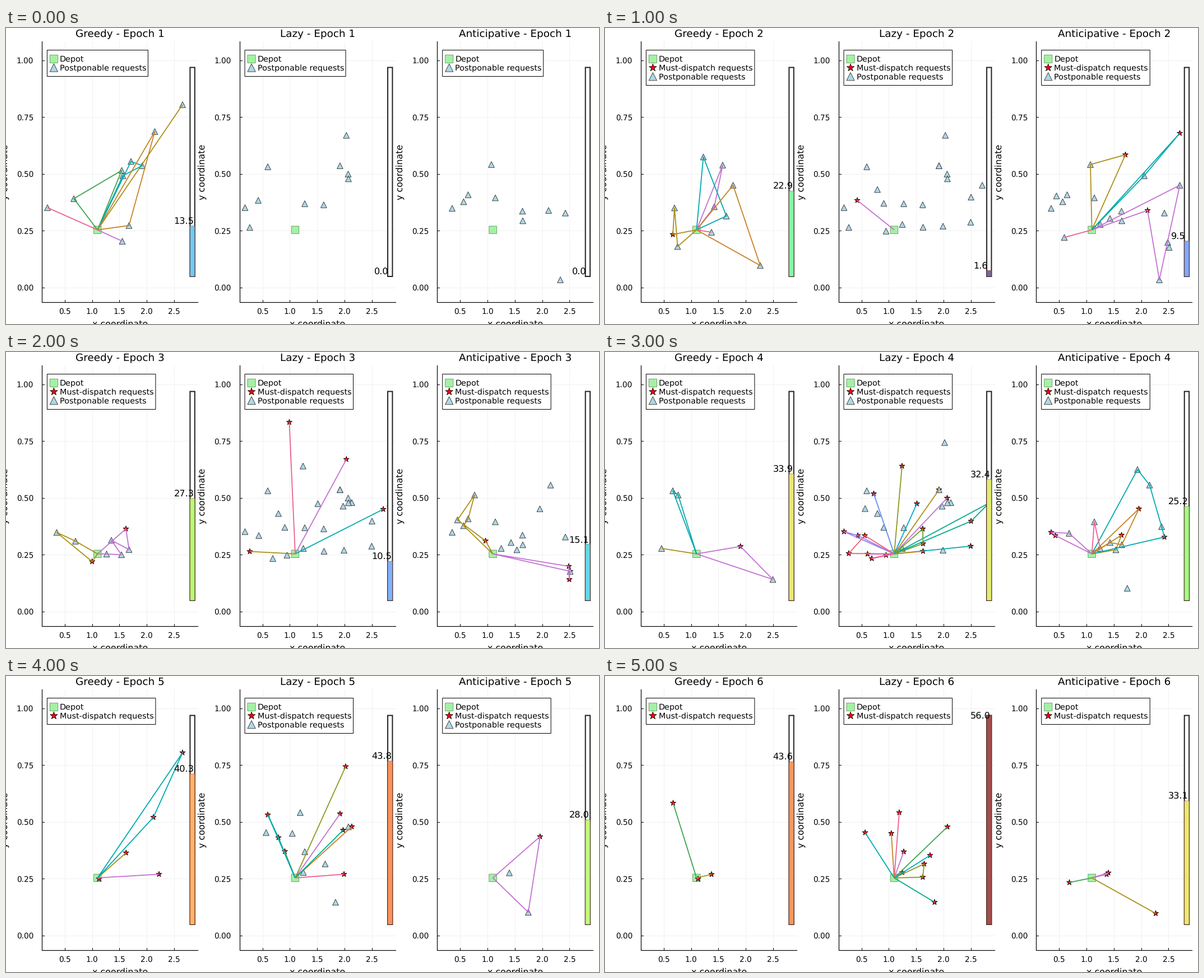
Recreate the animation shown at these times as a matplotlib script. Size 1058 px wide and 529 px high, loop 6 s.

```python
import math

import matplotlib.pyplot as plt
from matplotlib.animation import FuncAnimation
from matplotlib.patches import Polygon, Rectangle

W, H, DPI = 1058, 529, 100
PT = 72 / DPI
PANEL = W / 3
EPOCHS = 6

LEFT, RIGHT, TOP, BOTTOM = 64, 342, 24, 490
X_TICKS = [(f"{0.5 * k:.1f}", 56.1 + 48.8 * k) for k in range(1, 6)]
Y_TICKS = [(f"{0.25 * k:.2f}", 463.9 - 101.5 * k) for k in range(5)]
BAR_LEFT, BAR_WIDTH, BAR_BOTTOM, BAR_HEIGHT, BAR_MAX = 328.4, 8.4, 444, 373.5, 56
DEPOT = (163.3, 360.8)

PALETTE = ["#009afa", "#e36f47", "#3ea44e", "#c371d2", "#ac8e18", "#00aaae",
           "#ed5e93", "#c68225", "#00a98d", "#8e971e", "#00a9cc", "#9b7fe9",
           "#618df6", "#f06073", "#dd65b6", "#6c9f33"]

# Marker outlines in a box from -1 to 1, y pointing down.
SQUARE = [(-1, -1), (1, -1), (1, 1), (-1, 1)]
TRIANGLE = [(0, -1), (1, 1), (-1, 1)]
STAR = [(r * math.sin(k * math.pi / 5), -r * math.cos(k * math.pi / 5))
        for k, r in enumerate([1, 0.382] * 5)]
STYLES = {
    "Depot": (SQUARE, "#a4f1a4", "#5c8c5c"),
    "Must-dispatch requests": (STAR, "red", "black"),
    "Postponable requests": (TRIANGLE, "lightblue", "#222222"),
}


def must(x, y, waited=0):
    """A request that turns urgent in the epoch it is served."""
    return x, y, waited, True


def soft(x, y, waited=0):
    """A request served while it could still be postponed."""
    return x, y, waited, False


# For each policy and epoch: the routes driven, each a list of stops.
GREEDY = [
    [[soft(121, 305), soft(206.5, 254.5)],
     [soft(207.5, 381)],
     [soft(315, 137)],
     [soft(208.5, 264), soft(243, 246), soft(223, 238.5)],
     [soft(74, 321)],
     [soft(265.5, 185), soft(219.5, 353)]],
    [[soft(210, 245), soft(195, 319.5)],
     [must(121, 369), soft(124, 321.5), soft(129.5, 390.5)],
     [soft(175.5, 230.5), soft(216.5, 336)],
     [soft(190, 365)],
     [soft(228.5, 281), soft(277, 424.5)]],
    [[must(214, 316), soft(219.5, 353), soft(188, 336.5), soft(206, 362.3), soft(179.5, 361)],
     [soft(124, 338), soft(90.5, 322.5), must(153.7, 374.5)]],
    [[must(241.7, 347.5), soft(299.5, 406.5)],
     [soft(101, 351)],
     [soft(121, 248), soft(130.5, 255.5)]],
    [[must(273, 354.3)],
     [must(214.2, 316)],
     [must(315, 137), must(263, 252.5)],
     [must(166, 362.5)]],
    [[must(121.5, 227)],
     [must(166, 362.5)],
     [must(190, 354.5)]],
]

LAZY = [
    [],
    [[must(97.4, 308, 1)]],
    [[must(254.6, 191.8, 2)],
     [must(82.3, 356.5, 2)],
     [must(320.4, 281, 1)],
     [must(152.8, 125.5)]],
    [[must(257.8, 261, 3)],
     [must(243.3, 246.2, 3)],
     [must(299.8, 347, 2)],
     [must(123.4, 369, 1), must(148.8, 363, 2)],
     [must(214.8, 356, 2)],
     [must(332.4, 270, 1), must(300.4, 302.3, 2)],
     [must(177.3, 203.8, 1)],
     [must(203.8, 271, 1)],
     [must(73.8, 321, 3), must(98.4, 328, 1)],
     [must(126.8, 253.3)],
     [must(82.3, 360), must(110.8, 328)],
     [must(115.8, 361)],
     [must(214.2, 316, 3), must(214.8, 342.5)]],
    [[must(243.3, 246.2, 3)],
     [must(144.8, 313.5, 3)],
     [must(114.4, 248, 4), must(133.4, 288.7, 3)],
     [must(250.4, 354.3, 3)],
     [must(264.3, 269.2, 2)],
     [must(248.8, 275.5, 2)],
     [must(253.3, 161.8, 1)]],
    [[must(258.3, 269.5, 5)],
     [must(180.4, 314, 5)],
     [must(177.8, 351, 4)],
     [must(111.4, 279.8, 2)],
     [must(172.3, 244, 1)],
     [must(158.1, 281.3, 1)],
     [must(235.3, 404.3, 1)],
     [must(216.8, 335.8, 1), must(214.3, 359.5)],
     [must(227.3, 320.5)]],
]

ANTICIPATIVE = [
    [],
    [[soft(320.2, 281), soft(283.7, 450, 1), must(262.7, 326, 1)],
     [soft(160.7, 244, 1), must(223.2, 226.5)],
     [must(320.2, 188), soft(256.7, 264)],
     [soft(114.2, 374.3)]],
    [[must(298.7, 383, 1), must(299.7, 406.5), must(301.2, 392, 1), soft(301.2, 392)],
     [soft(111.2, 310.5, 2), soft(119.2, 298, 2), soft(130.7, 255.5),
      soft(100.2, 300, 1), must(150.2, 337.5)]],
    [[must(98.2, 328), must(90.7, 322.3, 3), soft(122.7, 324)],
     [soft(206.2, 353.5, 1), must(216.2, 327.3, 3)],
     [soft(244.7, 210), soft(266.3, 237.8, 1), soft(287.7, 312), must(292.7, 330.7, 3)],
     [soft(167.7, 303.5, 3), soft(178.2, 351, 2)],
     [soft(195.7, 340.5, 2), soft(216.7, 344.5, 3), must(247.2, 280.3, 1)]],
    [[must(247.5, 287), soft(226.5, 422.3, 1)]],
    [[must(123.2, 369)],
     [must(192.7, 351.8, 1), must(189.7, 354.5)],
     [must(277.2, 424.3)]],
]

POLICIES = [
    ("Greedy", GREEDY, [13.5, 22.9, 27.3, 33.9, 40.3, 43.6]),
    ("Lazy", LAZY, [0.0, 1.6, 10.5, 32.4, 43.8, 56.0]),
    ("Anticipative", ANTICIPATIVE, [0.0, 9.5, 15.1, 25.2, 28.0, 33.1]),
]

plt.rcParams.update({"font.family": "DejaVu Sans", "text.hinting": "none"})
fig = plt.figure(figsize=(W / DPI, H / DPI), dpi=DPI, facecolor="white")
ax = fig.add_axes([0, 0, 1, 1])


def text(x, y, label, size, ha="center", **kw):
    kw.setdefault("va", "baseline")
    ax.text(x, y, label, size=size * PT, ha=ha, zorder=8, **kw)


def line(xs, ys, color, width, zorder, **kw):
    ax.plot(xs, ys, color=color, lw=width * PT, zorder=zorder, **kw)


def box(x, y, w, h, face, edge, width, zorder):
    ax.add_patch(Rectangle((x, y), w, h, fc=face, ec=edge, lw=width * PT,
                           zorder=zorder, joinstyle="miter", snap=False))


def marker(x, y, kind, size, zorder):
    outline, face, edge = STYLES[kind]
    corners = [(x + u * size / 2, y + v * size / 2) for u, v in outline]
    ax.add_patch(Polygon(corners, fc=face, ec=edge, lw=0.8 * PT, zorder=zorder,
                         joinstyle="miter", snap=False))


def draw_axes(x0, title):
    for label, x in X_TICKS:
        x += x0
        line([x, x], [TOP, BOTTOM], "#f0f0f0", 1, 0)
        line([x, x], [BOTTOM, BOTTOM - 4], "black", 1, 1)
        text(x, 511, label, 13.6)
    for label, y in Y_TICKS:
        line([x0 + LEFT, x0 + RIGHT], [y, y], "#f0f0f0", 1, 0)
        line([x0 + LEFT, x0 + LEFT + 4], [y, y], "black", 1, 1)
        text(x0 + 49.2, y + 5, label, 13.6, "right")
    line([x0 + LEFT, x0 + LEFT, x0 + RIGHT], [TOP, BOTTOM, BOTTOM], "black", 1.2, 1)
    text(x0 + 203.5, 15.8, title, 18.4)
    text(x0 + 203.3, 533.5, "x coordinate", 15.85)
    text(x0 - 2.2, 257, "y coordinate", 15.85, rotation=90, va="center")


def draw_legend(x0, kinds):
    width = 193.5 if "Must-dispatch requests" in kinds else 180
    box(x0 + 73.4, 39.5, width, 15 + 16 * len(kinds), "white", "black", 1, 6)
    for row, kind in enumerate(kinds):
        y = 55.25 + 15.75 * row
        marker(x0 + 85.4, y, kind, 14.2, 7)
        text(x0 + 95.9, y + 5.1, kind, 14.4, "left")


def draw_bar(x0, value):
    x, filled = x0 + BAR_LEFT, BAR_HEIGHT * value / BAR_MAX
    box(x, BAR_BOTTOM, BAR_WIDTH, -BAR_HEIGHT, "white", "#222222", 2, 5)
    if value:
        color = plt.get_cmap("turbo")(value / BAR_MAX)[:3]
        tint = [0.3 + 0.7 * c for c in color]
        box(x, BAR_BOTTOM, BAR_WIDTH, -filled, tint, (0.6, 0.15, 0.05, 0.45), 1, 5.5)
    # The label rides above the level but stays at the bar's upper end.
    baseline = max(BAR_BOTTOM - filled - 3, BAR_BOTTOM - BAR_HEIGHT + 6)
    text(x0 + 317.3, baseline, f"{value:.1f}", 16.1)


def draw_requests(x0, plan, epoch):
    """Draw waiting and served requests; return the kinds on show."""
    urgent, waiting = [], []
    for last in range(epoch, EPOCHS):
        for x, y, waited, is_must in sum(plan[last], []):
            if last - waited <= epoch:
                due = is_must and last == epoch
                (urgent if due else waiting).append((x, y))
    shown = [[DEPOT], urgent, waiting]
    for z, (kind, points) in enumerate(zip(STYLES, shown)):
        for x, y in points:
            marker(x0 + x, y, kind, 13.5 if kind == "Depot" else 10.7, 2 + 0.1 * z)

    first_color = 2 if epoch in (0, EPOCHS - 1) else 3
    for color, route in zip(PALETTE[first_color:], plan[epoch]):
        path = [DEPOT] + [stop[:2] for stop in route]
        if len(route) > 1:
            path.append(DEPOT)
        line([x0 + x for x, _ in path], [y for _, y in path], color, 1.8, 3,
             solid_joinstyle="round", solid_capstyle="butt")
    return [kind for kind, points in zip(STYLES, shown) if points]


def draw(epoch):
    ax.clear()
    ax.set(xlim=(0, W), ylim=(H, 0))
    ax.axis("off")
    for column, (name, plan, costs) in enumerate(POLICIES):
        x0 = column * PANEL
        draw_axes(x0, f"{name} - Epoch {epoch + 1}")
        draw_legend(x0, draw_requests(x0, plan, epoch))
        draw_bar(x0, costs[epoch])
    return []


animation = FuncAnimation(fig, draw, frames=EPOCHS, interval=1000, repeat=True,
                          repeat_delay=0)
plt.show()
```
